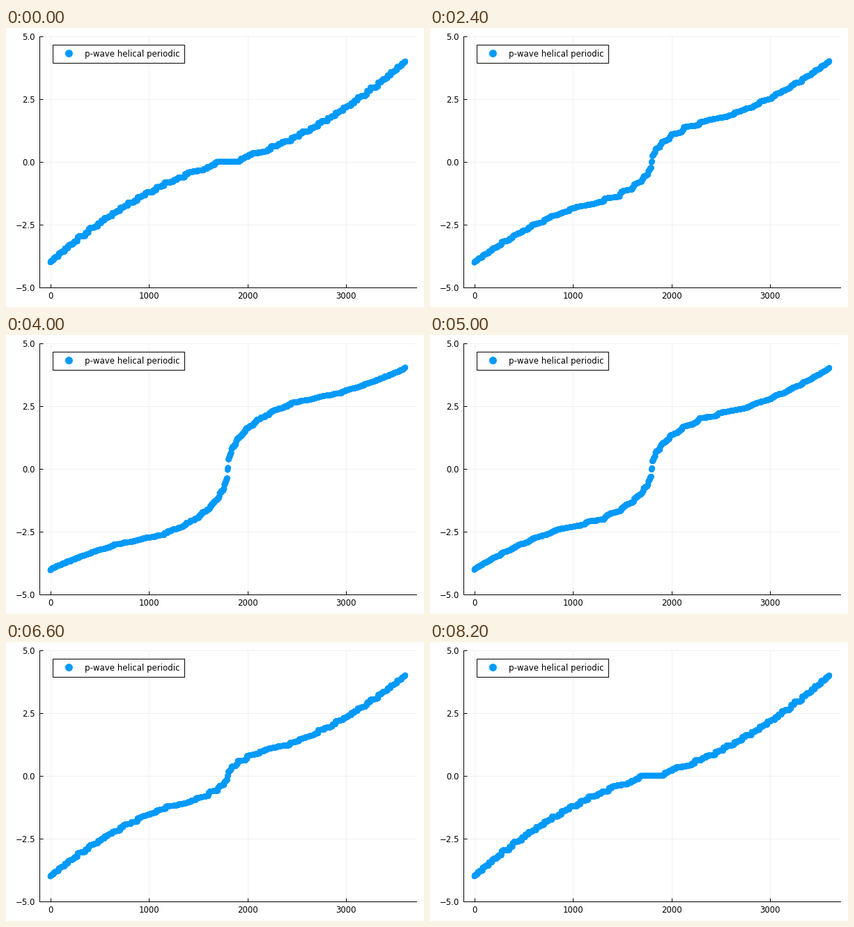
Recreate the animation shown at these times as a matplotlib script. Size 600 by 400 pixels, loop 8400 ms.

```python
import numpy as np
import matplotlib.pyplot as plt
from matplotlib.animation import FuncAnimation
from matplotlib.patches import Rectangle

W, H, DPI = 600, 400, 100
PX = 72 / DPI                      # points per pixel
BLUE = (0, 154 / 255, 250 / 255)
FONT = dict(family="DejaVu Sans", size=11.8 * PX)
SIDE = 30                          # lattice sites per direction
STEPS = 21                         # pairing strengths, swept up and back

k = 2 * np.pi * np.arange(SIDE) / SIDE
KX, KY = np.meshgrid(k, k)
XI = -2 * (np.cos(KX) + np.cos(KY))
GAP = np.sin(KX) ** 2 + np.sin(KY) ** 2


def spectrum(delta):
    """Sorted energies of the four bands, with a small splitting."""
    e = np.sqrt(XI ** 2 + delta ** 2 * GAP).ravel()
    split = 0.01 * delta ** 2
    return np.sort(np.concatenate([e + split, e - split, split - e, -e - split]))


def add_dots(axes, x, y, size, **style):
    """Borderless dots; two equal colours keep them at subpixel positions."""
    points = axes.scatter(x, y, s=(size * PX) ** 2, linewidths=0, **style)
    points.set_facecolor([BLUE, BLUE])
    return points


fig = plt.figure(figsize=(W / DPI, H / DPI), dpi=DPI, facecolor="white")
left, right, top, bottom = 48.4, 588.5, 11.9, 371.9
ax = fig.add_axes([left / W, 1 - bottom / H, (right - left) / W, (bottom - top) / H])
n = 4 * SIDE ** 2
pad = 0.03 * (n - 1)
ax.set_xlim(1 - pad, n + pad)
ax.set_ylim(-5, 5)
ax.set_xticks([0, 1000, 2000, 3000])
ax.set_yticks([-5, -2.5, 0, 2.5, 5], ["−5.0", "−2.5", "0.0", "2.5", "5.0"])
ax.tick_params(direction="in", length=5 * PX, width=PX, pad=6.5 * PX)
for label in ax.get_xticklabels() + ax.get_yticklabels():
    label.set(**FONT)
ax.spines[["top", "right"]].set_visible(False)
ax.spines[["left", "bottom"]].set_linewidth(PX)
ax.grid(color="#f0f0f0", linewidth=PX)
ax.set_axisbelow(True)

index = np.arange(1, n + 1)
dots = add_dots(ax, index, spectrum(0), 8, clip_on=False, zorder=3)

# Legend, laid out in stage pixels
overlay = fig.add_axes([0, 0, 1, 1])
overlay.set(xlim=(0, W), ylim=(H, 0))
overlay.axis("off")
overlay.add_patch(Rectangle((66.5, 23.5), 189, 26, facecolor="white",
                            edgecolor="black", linewidth=PX))
add_dots(overlay, [90.4], [36.6], 11, zorder=3)
overlay.text(113, 41, "p-wave helical periodic", va="baseline", **FONT)


def draw(frame):
    step = min(frame, 2 * STEPS - 1 - frame)
    dots.set_offsets(np.column_stack([index, spectrum(0.1 * step)]))
    return [dots]


anim = FuncAnimation(fig, draw, frames=2 * STEPS, interval=200, repeat=True)
plt.show()
```
